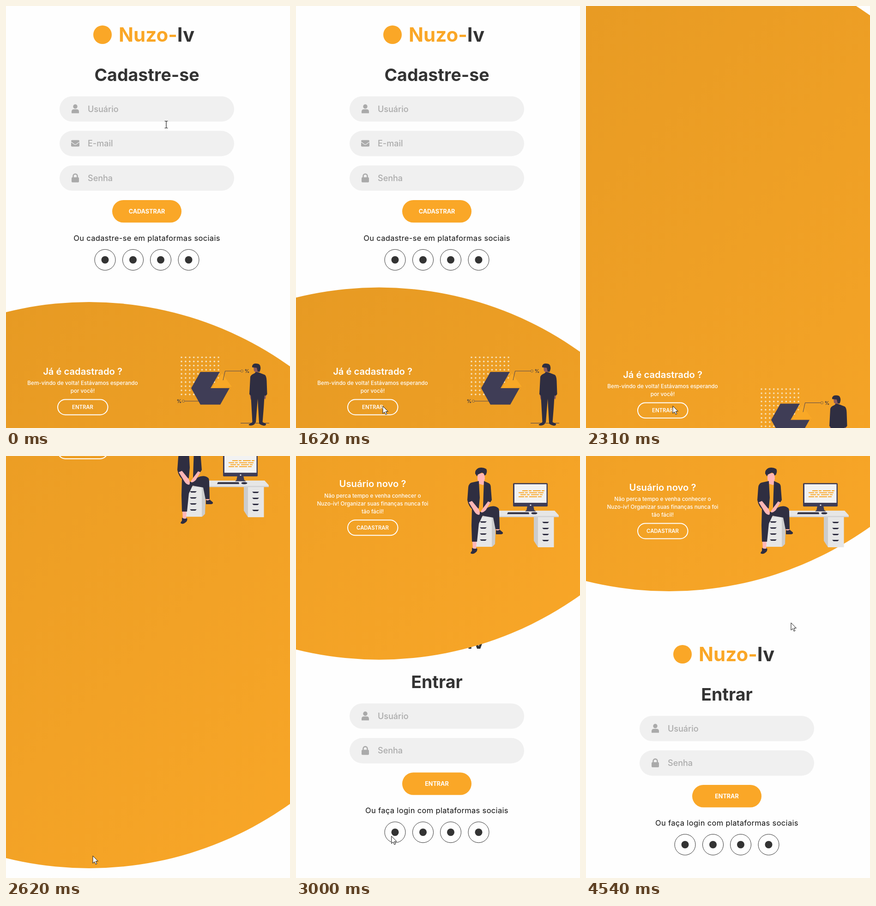
These frames come from a looping animation (615 px wide and 911 px high, 4.69 s). An HTML page:

```html
<!DOCTYPE html>
<html lang="pt-BR">
<head>
<meta charset="utf-8">
<title>Cadastro</title>
<style>
  html, body { margin: 0; width: 100%; height: 100%; overflow: hidden; background: #fefefe; }
  svg { display: block; width: 615px; height: 911px; font-family: Inter, "Open Sans", sans-serif; font-optical-sizing: none; }
  .brand { font-size: 42px; font-weight: 700; fill: #faa727; }
  .title { font-size: 37.5px; font-weight: 700; fill: #333; text-anchor: middle; }
  .hint { font-size: 18px; font-weight: 500; fill: #aaa; }
  .cta { font-size: 12.6px; font-weight: 700; fill: #fff; text-anchor: middle; }
  .note { font-size: 16.5px; letter-spacing: .02em; fill: #111; text-anchor: middle; }
  .panel { fill: #fff; text-anchor: middle; font-size: 11.7px; font-weight: 500; }
  .panel .head { font-size: 20.2px; font-weight: 600; }
  .panel .btn { font-size: 11.3px; font-weight: 600; }
  .pct { font-size: 10.5px; font-weight: 600; fill: #2f2e41; text-anchor: middle; }
</style>
</head>
<body>
<svg id="stage" viewBox="0 0 615 911" xmlns="http://www.w3.org/2000/svg"></svg>
<script>
const DARK = '#2f2e41', SLATE = '#3f3d56', GOLD = '#faa727', SKIN = '#ffb6b6';

const range = n => [...Array(n).keys()];
const text = (cls, x, y, s) => `<text class="${cls}" x="${x}" y="${y}">${s}</text>`;
const path = (d, fill) => `<path d="${d}" fill="${fill}"/>`;
const line = (d, color, w = 1) => `<path d="${d}" fill="none" stroke="${color}" stroke-width="${w}"/>`;
const dot = (x, y, r, fill) => `<circle cx="${x}" cy="${y}" r="${r}" fill="${fill}"/>`;
const rect = (x, y, w, h, fill, r = 0) =>
  `<rect x="${x}" y="${y}" width="${w}" height="${h}" rx="${r}" fill="${fill}"/>`;

// Icons are centred on the origin
const icons = {
  user: dot(0, -5, 4.7, '#aaa') + path('M-8 9V6Q-8 1-3 1H3Q8 1 8 6V9Q8 9.5 7 9.5H-7Q-8 9.5-8 9Z', '#aaa'),
  mail: rect(-9, -7, 18, 14, '#aaa', 2) + line('M-9.5-3.5L-2 2Q0 3.4 2 2L9.5-3.5', '#f0f0f0', 1.2),
  lock: rect(-8, -1.5, 16, 11, '#aaa', 2) + line('M-4.5-1V-4A4.5 4.5 0 0 1 4.5-4V-1', '#aaa', 2.6)
};

function field([icon, label], y) {
  return rect(116, y, 378, 54.6, '#f0f0f0', 27.3) +
    `<g transform="translate(150 ${y + 27})">${icons[icon]}</g>` + text('hint', 177, y + 33.6, label);
}

function form(id, top, title, fields, action, note) {
  const pitch = 74.6, first = top + 195, y = Math.round(first + pitch * fields.length);
  return `<g id="${id}">` + dot(209, top + 62, 20, GOLD) +
    text('brand', 244, top + 77, 'Nuzo-<tspan fill="#333">Iv</tspan>') +
    text('title', 305, top + 162, title) +
    fields.map((f, i) => field(f, first + i * pitch)).join('') +
    rect(230, y, 150, 48.5, GOLD, 24.25) + text('cta', 305, y + 29, action) +
    text('note', 305, y + 88, note) +
    [214.5, 275, 335, 395.5].map(x =>
      `<circle cx="${x}" cy="${y + 129}" r="22.5" fill="none" stroke="#333"/>` +
      dot(x, y + 129, 8, '#333')).join('') + '</g>';
}

function panel(id, top, head, lines, action) {
  const y = top + 17 * lines.length;
  return `<g id="${id}" class="panel">` + text('head', 166, top, head) +
    lines.map((s, i) => text('', 166, top + 22.5 + 17 * i, s)).join('') +
    `<rect x="112" y="${y + 20}" width="108.5" height="33" rx="16.5" fill="none" stroke="#fff" stroke-width="2"/>` +
    text('btn', 166, y + 40.3, action) + '</g>';
}

function chartArt() {
  const dots = range(100).map(i =>
    dot(380 + i % 10 * 8.9, 758.5 + Math.floor(i / 10) * 8.9, 1.8, '#f7e0b6')).join('');
  return '<g id="chart">' + dots +
    path('M421 790H463L443 825H484L464 860.5H421L401 825Z', SLATE) +
    path('M468 793L489 822L446 824.5Z', '#f9a826') +
    line('M470 808L474.5 788H508M387 853H417', SLATE, .9) +
    line('M508.3 788a2.6 2.6 0 1 0 5.2 0a2.6 2.6 0 1 0-5.2 0M381.5 853a2.6 2.6 0 1 0 5.2 0a2.6 2.6 0 1 0-5.2 0', '#7a6144', .9) +
    text('pct', 522, 792, '%') + text('pct', 375, 857, '%') +
    line('M508 900.5H570', SLATE) +
    path('M536 780H546V789L548 794H540L540 790L537 788Z', '#8c5b5f') +
    path('M533 777Q535 771 543 772Q550 772 551 779Q552 784 549 790L545 789L543 781L533 780Z', DARK) +
    path('M528 839H533L534 847L530 850ZM556 839H563L562 849L558 847Z', '#8c5b5f') +
    path('M530 836H560L558 868L555.5 899H548L545 848L541 899H533.5Z', DARK) +
    path('M541 790L547 791L560 796Q564 798 564.5 809L565.5 838L563 841H530L527 838L529 801Q530 796 538 793Z', DARK) +
    path('M534 898H540.5L538 903Q533 907 526 905Q525 903 528 902ZM548 898H555L563 902Q564 906 558 906Q550 904 548 901Z', DARK) +
    '</g>';
}

function drawers(x, lip) {
  return range(4).map(i => path(`M${x} ${lip + 13 * i}h15l-3 3h-9Z`, DARK)).join('');
}

function deskArt() {
  const code = [[490, 75], [482, 79.3], [486, 83.6], [482, 87.9]].map(([x, y], i) =>
    `<path d="M${x} ${y}H${538 - i * 2}" stroke="${GOLD}" stroke-width="2" stroke-dasharray="12 2 6 3 17 2"/>`).join('');
  return '<g id="desk">' +
    path('M397 131H433L431 190L425 196H390Z', '#ccc') + rect(390, 131, 34, 65, '#e6e6e6') +
    path('M515 131H558V197H524L515 183Z', '#ccc') + rect(524, 131, 34.5, 66, '#e6e6e6') +
    drawers(398, 141) + drawers(533, 142) +
    path('M404 118H560L569 128V132H404Z', '#e6e6e6') + rect(404, 129.5, 165, 2.5, '#d2d2d4') +
    path('M501 108H514L516 117L520 119.5H496L499 117Z', SLATE) +
    rect(470, 58.5, 75, 50.5, SLATE, 2) + rect(473, 61, 69.5, 40, '#f2f2f2') + dot(508, 106, 1.6, '#f2f2f2') +
    code + path('M459 121.5H504L505 125.5H457Z', DARK) +
    `<ellipse cx="516" cy="123.5" rx="6.5" ry="2.3" fill="${DARK}"/>` +
    // seated person
    path('M393 38L408 37L409 49Q406 58 408 62L394 64Q396 56 393 51Z', SKIN) +
    path('M396 60L403 62L406 72V110L397 114L395 70Z', GOLD) +
    path('M382 184H391L390 201H383Z', SKIN) + path('M433 152H440L441 163H434Z', SKIN) +
    path('M381 113L400 121Q420 105 432 109Q440 111 440 119L441 158H432L427 133L404 129L396 146L392 185H381L380 150Z', DARK) +
    path('M396 54L382 57Q374 58 373 68L371 95Q374 110 384 117L392 117L396 112L398 90Z', DARK) +
    path('M407 54L418 59Q422 61 422 70L424 95L412 114L405 112L406 80Z', DARK) +
    path('M374 100L381 97L395 114Q400 121 397 127Q391 127 387 121Z', SKIN) +
    path('M416 98L421 100L411 117Q402 125 400 120L406 111Z', SKIN) +
    path('M388 38Q387 30 395 26Q404 23 412 28Q415 33 411 41L408 42Q407 36 402 36L394 40L392 44Z', DARK) +
    path('M381 198Q386 202 392 199Q394 205 388 209Q383 213 378 210Q378 207 381 205Z', DARK) +
    path('M433 160Q438 162 441 159L448 165Q449 169 443 169H433Z', DARK) + '</g>';
}

const stage = document.getElementById('stage');
stage.innerHTML =
  '<defs><linearGradient id="sun" x1="0" y1="0" x2="1" y2="1">' +
  '<stop stop-color="#e29722"/><stop offset="1" stop-color="#fba828"/></linearGradient></defs>' +
  form('signIn', 366, 'Entrar', [['user', 'Usuário'], ['lock', 'Senha']],
    'ENTRAR', 'Ou faça login com plataformas sociais') +
  form('signUp', 0, 'Cadastre-se', [['user', 'Usuário'], ['mail', 'E-mail'], ['lock', 'Senha']],
    'CADASTRAR', 'Ou cadastre-se em plataformas sociais') +
  '<circle id="disc" cx="180" r="750" fill="url(#sun)"/>' +
  panel('back', 795.5, 'Já é cadastrado ?',
    ['Bem-vindo de volta! Estávamos esperando', 'por você!'], 'ENTRAR') + chartArt() +
  panel('fresh', 74.5, 'Usuário novo ?',
    ['Não perca tempo e venha conhecer o', 'Nuzo-iv! Organizar suas finanças nunca foi', 'tão fácil!'], 'CADASTRAR') + deskArt() +
  '<path id="arrow" d="M0 0V16L3.7 12.6L6.3 18.3L8.8 17.2L6.3 11.6H11.3Z" fill="#fff" stroke="#111"/>' +
  '<path id="beam" d="M-3.5-7.5H-1L0-6.5L1-7.5H3.5M0-6.5V6.5M-3.5 7.5H-1L0 6.5L1 7.5H3.5" fill="none" stroke="#222" stroke-width="1.2"/>';

const el = {};
for (const node of stage.querySelectorAll('[id]')) el[node.id] = node;

const LOOP = 4690, TICK = 77, CLICK = 1420;
const clamp = x => Math.min(1, Math.max(0, x));

// cubic-bezier(.42, 0, .58, 1)
function easeInOut(x) {
  let lo = 0, hi = 1;
  for (let i = 0; i < 24; i++) {
    const s = (lo + hi) / 2, r = 1 - s;
    if (1.26 * s * r * r + 1.74 * s * s * r + s * s * s < x) lo = s; else hi = s;
  }
  return lo * lo * (3 - 2 * lo);
}
const progress = (t, delay, span) => easeInOut(clamp((t - CLICK - delay) / span));

// time, x, y
const route = [
  [0, 347, 256], [150, 347, 256], [460, 417, 284], [1070, 200, 857], [1300, 188, 864],
  [2920, 188, 863], [3310, 276, 664], [3950, 444, 360], [LOOP, 444, 360]
];
function pointer(t) {
  const i = route.findIndex(k => k[0] > t), a = route[i - 1], b = route[i];
  const f = (t - a[0]) / (b[0] - a[0]);
  return [a[1] + (b[1] - a[1]) * f, a[2] + (b[2] - a[2]) * f];
}

const shift = (node, y, x = 0) => node.setAttribute('transform', `translate(${x} ${y.toFixed(2)})`);

function draw(t) {
  el.disc.setAttribute('cy', 1389 - 1847 * progress(t, 15, 1955));
  const image = progress(t, 596, 888), copy = progress(t, 793, 888);
  shift(el.chart, 300 * image);
  shift(el.desk, -300 * (1 - image));
  shift(el.back, 300 * copy);
  shift(el.fresh, -300 * (1 - copy));

  const slide = progress(t, 793, 987), fade = progress(t, 691, 197);
  shift(el.signUp, 329 * slide);
  shift(el.signIn, -329 * (1 - slide));
  el.signUp.setAttribute('opacity', 1 - fade);
  el.signIn.setAttribute('opacity', fade);

  const [x, y] = pointer(t), typing = t < 600 || (t > 3200 && t < 3530);
  shift(el.arrow, y, x);
  shift(el.beam, y, x);
  el.arrow.setAttribute('visibility', typing ? 'hidden' : 'visible');
  el.beam.setAttribute('visibility', typing ? 'visible' : 'hidden');
}

const start = performance.now();
function frame() {
  const t = (performance.now() - start) % LOOP;
  draw(Math.min(Math.floor((t + 10) / TICK) * TICK, LOOP - 1));
  requestAnimationFrame(frame);
}
frame();
</script>
</body>
</html>
```
